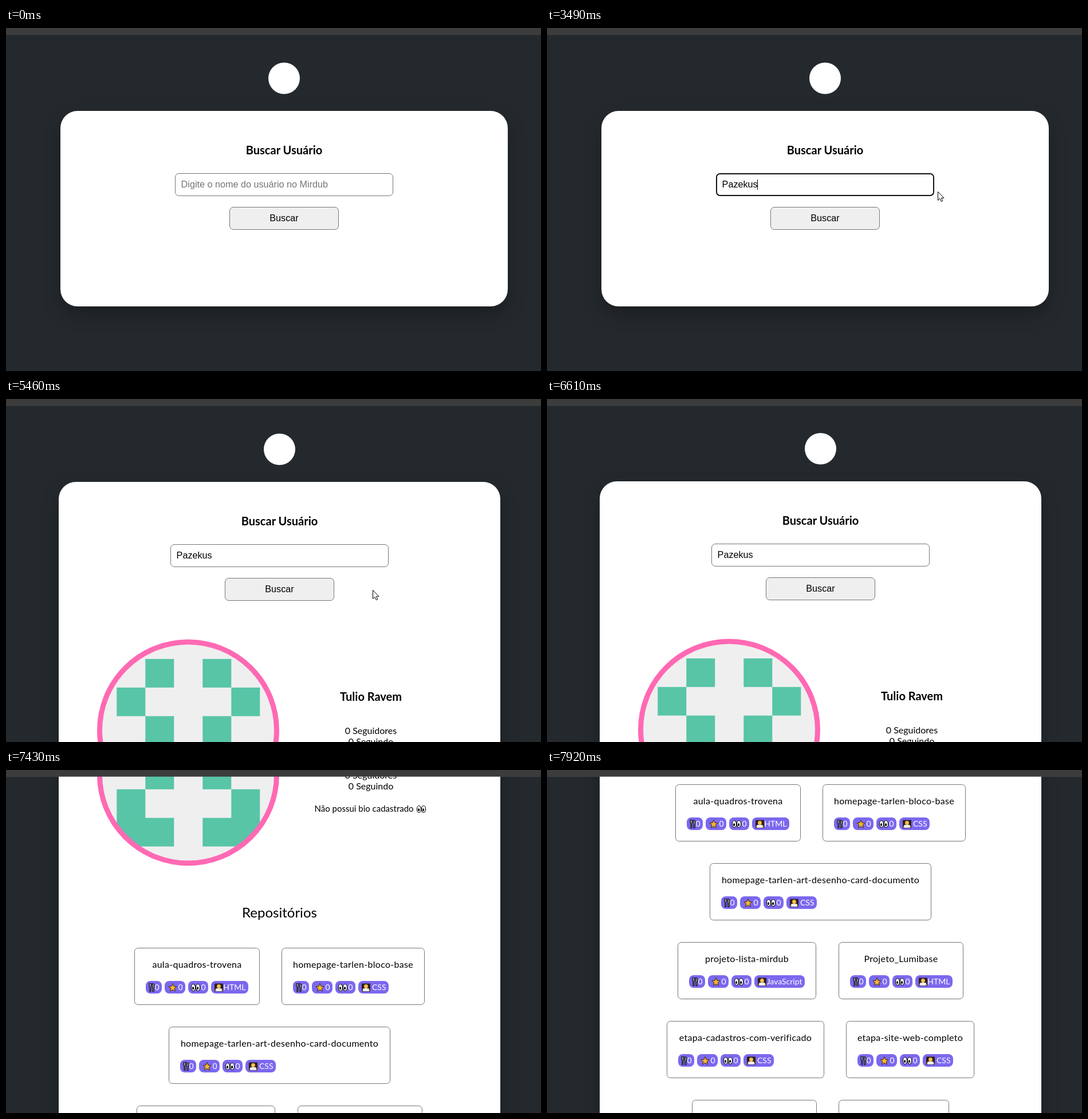
Animation, 934 px wide and 600 px high, one loop 8 s. Source, as an HTML page:

```html
<!DOCTYPE html>
<html lang="pt-BR">
<head>
<meta charset="utf-8">
<title>Buscar Usuário</title>
<style>
  html, body { margin: 0; width: 100%; height: 100%; overflow: hidden; background: #24292d; }
  svg { display: block; }
  text { font: 16px Lato, "Open Sans", sans-serif; }
  .mid { text-anchor: middle; }
  .bold { font-size: 20px; font-weight: 700; }
  .title { font-size: 24px; }
  .bio { font-size: 15px; }
  .repo { letter-spacing: .3px; }
  .tag { font-size: 14px; fill: #fff; text-anchor: end; }
  .field { font: 16.2px "Liberation Sans", Arial, sans-serif; }
  .line { fill: #fff; stroke: #767676; }
  #panel { fill: #fff; filter: drop-shadow(0 14px 14px rgba(0, 0, 0, .25)); }
  #cursor path { fill: #fff; stroke: #000; stroke-linejoin: round; }
</style>
</head>
<body>
<svg width="934" height="600" viewBox="0 0 934 600">
  <defs>
    <g id="fork" stroke="#15151a" stroke-width="1.2" fill="#8d959c">
      <path d="M-4.5-7h3.6v5l-.9 1v8h-1.8v-8l-.9-1z"/>
      <path d="M1-7q3.5 0 3.5 4v3h-1v7h-2z"/>
    </g>
    <path id="star" fill="#f9b52c" stroke="#3a2a18" stroke-linejoin="round"
      d="M0-7L2-2.2L7-1.8L3.2 1.6L4.4 6.6L0 4L-4.4 6.6L-3.2 1.6L-7-1.8L-2-2.2Z"/>
    <g id="eyes">
      <g fill="#fff" stroke="#111" stroke-width="1.2">
        <ellipse cx="-4" rx="3.6" ry="6"/><ellipse cx="4" rx="3.6" ry="6"/>
      </g>
      <ellipse cx="-4.4" cy="1.2" rx="1.6" ry="2.4"/><ellipse cx="3.6" cy="1.2" rx="1.6" ry="2.4"/>
    </g>
    <g id="coder">
      <rect x="-7.5" y="-7" width="15" height="14" rx="1" fill="#2a211d"/>
      <path d="M-6.5 4Q0-2 6.5 4V6H-6.5Z" fill="#f2a33a"/>
      <circle cy="-2" r="3.4" fill="#ffc04a"/>
      <rect x="-5" y="1.5" width="10" height="5" fill="#eceff1"/>
    </g>
  </defs>
  <g id="page">
    <rect id="panel" y="145" rx="30"/>
    <g id="form">
      <circle cx="485.5" cy="88" r="27.5" fill="#fff"/>
      <text class="mid bold" x="485.5" y="221">Buscar Usuário</text>
      <rect id="input" class="line"/>
      <text id="value" class="field" x="305.6" y="279"></text>
      <rect id="caret" y="265" width="1" height="18"/>
      <rect id="button"/>
      <text id="label" class="field mid" x="485.5" y="338">Buscar</text>
    </g>
    <g id="result"></g>
  </g>
  <rect width="934" height="11" fill="#3c3c3c"/>
  <rect y="11" width="934" height="1" fill="#4a4b4c" opacity=".7"/>
  <g id="cursor"><path/></g>
</svg>
<script>
const $ = id => document.getElementById(id);
const set = (el, attrs) => { for (const k in attrs) el.setAttribute(k, attrs[k]); };

const LOOP = 8000, LOADED = 5120, BLUR = 4850, BLINK = 530;
const USER = "Pazekus";
const HINT = "Digite o nome do usuário no Mirdub";
const keyTimes = [1230, 2230, 2700, 2830, 2960, 3090, 3290, 3490]; // focus, then one per letter

const scrollKeys = [[6520, 0], [6590, 1], [6660, 55], [6730, 165], [6800, 280], [6870, 341], [6940, 346],
  [7150, 346], [7220, 352], [7290, 420], [7360, 505], [7430, 571], [7570, 650], [7780, 780], [7920, 857]];
const mouseKeys = [[710, 893, 334], [850, 820, 320], [1060, 660, 282], [1200, 636, 274], [1270, 636, 274],
  [1410, 672, 281], [1480, 682, 285], [1550, 682, 286], [4210, 682, 286], [4490, 615, 312], [4700, 553, 333],
  [4840, 546, 335], [5190, 546, 335], [5400, 640, 334], [5680, 830, 325], [5890, 913, 319]];

const shapes = {
  arrow: "M.5.5V15.5L4 12.2L6.3 17.6L8.8 16.5L6.5 11.3H11Z",
  hand: "M-1 12V1.6a1.6 1.6 0 0 1 3.2 0V7.5a1.5 1.5 0 0 1 3 .5a1.5 1.5 0 0 1 3 1a1.4 1.4 0 0 1 2.6 .8" +
    "V15c0 3-1 4-1.8 6.5H1.5C1 18.5-2 16-4.5 13c-1-2 .8-3 2-1.8Z",
  beam: "M-3-8H3M0-8V8M-3 8H3"
};

// Piecewise linear value of [time, ...numbers] keys
function track(keys, t) {
  const i = keys.findIndex(k => k[0] > t);
  if (i < 0) return keys[keys.length - 1].slice(1);
  if (!i) return keys[0].slice(1);
  const a = keys[i - 1], b = keys[i], p = (t - a[0]) / (b[0] - a[0]);
  return a.slice(1).map((v, j) => v + (b[j + 1] - v) * p);
}

const text = (cls, x, y, s) => `<text class="${cls}" x="${x}" y="${y}">${s}</text>`;

function badges(x, y, lang) {
  const langWidth = { HTML: 65, CSS: 53, JavaScript: 88 }[lang];
  return [["fork", 28, 10.5, 0], ["star", 36, 14, 0], ["eyes", 35, 13, 0], ["coder", langWidth, 13.5, lang]]
    .map(([icon, w, cx, s]) => {
      const svg = `<rect x="${x}" y="${y}" width="${w}" height="22" rx="8" fill="#7b68ee"/>
        <use href="#${icon}" x="${x + cx}" y="${y + 11.5}"/>` + text("tag", x + w - 4.5, y + 16, s);
      x += w + 5;
      return svg;
    }).join("");
}

function repo([x, row, w, name, lang]) {
  const y = 882 + row * 138;
  return `<rect class="line" x="${x + .5}" y="${y + .5}" width="${w - 1}" height="99" rx="6"/>` +
    (name ? text("mid repo", x + w / 2, y + 35, name) + badges(x + 20, y + 58, lang) : "");
}

function avatar() {
  const rows = [[1, 3], [0, 4], [1, 3], [0, 4], [0, 1, 3, 4]];
  const cells = rows.map((cols, r) => cols.map(c => `M${193.3 + c * 50} ${454.8 + r * 50}h50v50h-50z`).join("")).join("");
  return `<clipPath id="round"><circle cx="318" cy="579.5" r="151"/></clipPath>
    <circle cx="318" cy="579.5" r="154.5" fill="#efefef"/>
    <path d="${cells}" fill="#58c5a7" clip-path="url(#round)"/>
    <circle cx="318" cy="579.5" r="154.5" fill="none" stroke="#ff69b4" stroke-width="9"/>`;
}

$("result").innerHTML = avatar() +
  text("mid bold", 637, 528, "Tulio Ravem") +
  text("mid", 637, 586, "0 Seguidores") +
  text("mid", 637, 605, "0 Seguindo") +
  text("bio", 538.5, 644, "Não possui bio cadastrado") +
  `<use href="#eyes" x="725" y="639.5"/>` +
  text("mid title", 477.5, 829, "Repositórios") +
  [
    [224, 0, 219, "aula-quadros-trovena", "HTML"],
    [481, 0, 250, "homepage-tarlen-bloco-base", "CSS"],
    [284, 1, 387, "homepage-tarlen-art-desenho-card-documento", "CSS"],
    [228, 2, 242, "projeto-lista-mirdub", "JavaScript"],
    [509, 2, 218, "Projeto_Lumibase", "HTML"],
    [209, 3, 275, "etapa-cadastros-com-verificado", "CSS"],
    [522, 3, 224, "etapa-site-web-completo", "CSS"],
    [253, 4, 218],
    [509, 4, 193]
  ].map(repo).join("");

function drawInput(t) {
  const pressed = keyTimes.filter(k => k <= t);
  const focused = pressed.length > 0 && t < BLUR;
  const typed = USER.slice(0, Math.max(0, pressed.length - 1));
  set($("input"), focused
    ? { x: 296, y: 255, width: 379, height: 38, rx: 6, style: "stroke:#101010;stroke-width:2" }
    : { x: 295.5, y: 254.5, width: 380, height: 39, rx: 6.5, style: "" });
  $("value").textContent = typed || HINT;
  set($("value"), { fill: typed ? "#000" : "#757575" });
  const since = t - pressed[pressed.length - 1];
  const lit = focused && Math.floor(since / BLINK) % 2 === 0;
  set($("caret"), {
    x: typed ? Math.round(305.4 + $("value").getComputedTextLength()) : 306,
    y: typed ? 265 : 266,
    visibility: lit ? "visible" : "hidden"
  });
}

function drawMouse(t, step, shift) {
  const [x, y] = track(mouseKeys, step).map(Math.round);
  const shown = t >= 730 && t < 5990;
  const over = (x0, y0, x1, y1) => shown && x > x0 + shift && x < x1 + shift && y > y0 && y < y1;
  const hover = over(390, 313, 581, 353);
  const shape = hover ? "hand" : over(295, 254, 676, 294) ? "beam" : "arrow";
  set($("cursor"), { transform: `translate(${x} ${y})`, visibility: shown ? "visible" : "hidden" });
  set($("cursor").firstChild, { d: shapes[shape] });
  set($("button"), hover
    ? { x: 391, y: 314, width: 189, height: 38, rx: 6, fill: "#ff69b4", stroke: "none" }
    : { x: 390.5, y: 313.5, width: 190, height: 39, rx: 6.5, fill: "#efefef", stroke: "#767676" });
  set($("label"), { fill: hover ? "#fff" : "#000" });
}

function draw(now) {
  const t = now % LOOP;
  const step = t - (t + 60) % 70;
  const loaded = t >= LOADED, shift = loaded ? -8 : 0;
  set($("panel"), loaded ? { x: 92, width: 771, height: 1700 } : { x: 95, width: 781, height: 342 });
  set($("form"), { transform: `translate(${shift} 0)` });
  set($("result"), { display: loaded ? "inline" : "none" });
  set($("page"), { transform: `translate(0 ${-Math.round(track(scrollKeys, step)[0])})` });
  drawInput(t);
  drawMouse(t, step, shift);
  requestAnimationFrame(draw);
}
requestAnimationFrame(draw);
</script>
</body>
</html>
```
